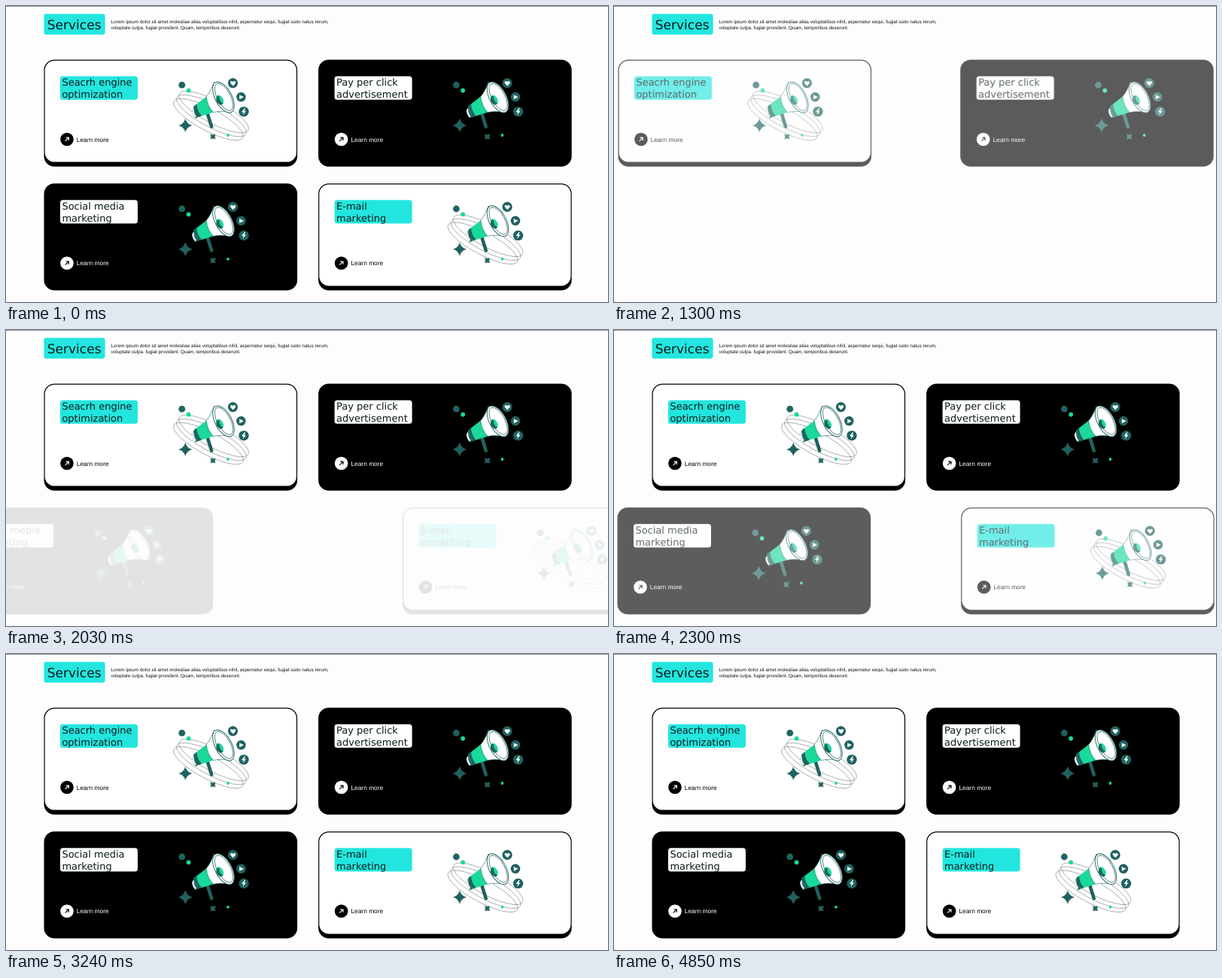
An HTML page that plays this animation: 800x394 px, repeating every 4910 ms.

```html
<!DOCTYPE html>
<html lang="en">
<head>
<meta charset="utf-8">
<title>Services</title>
<style>
  html, body { margin: 0; width: 100%; height: 100%; overflow: hidden; background: #fdfdfd; }
  svg { display: block; }
  text { text-rendering: geometricPrecision; }
  .title, .heading { font-family: "DejaVu Sans", Verdana, sans-serif; fill: #0b1a1a; }
  .title { font-size: 17px; }
  .heading { font-size: 13px; }
  .intro, .more { font-family: "Liberation Sans", Arial, sans-serif; }
  .intro { font-size: 6.3px; fill: #111; }
  .more { font-size: 8.4px; }
  .teal { fill: #1f625f; }
  .green { fill: #19d99b; }
  .line { fill: none; stroke: #1f625f; stroke-width: .7; }
  .ring { fill: none; stroke: #777; stroke-width: .55; }
</style>
</head>
<body>
<svg id="stage" width="800" height="394" overflow="hidden">
  <defs>
    <g id="rings" class="ring">
      <ellipse rx="52" ry="15" transform="translate(276 141) rotate(28)"/>
      <ellipse rx="52" ry="15" transform="translate(273 146) rotate(28)"/>
      <ellipse rx="52" ry="15" transform="translate(269 151) rotate(28)"/>
    </g>
    <g id="art">
      <circle class="teal" cx="233.8" cy="105.2" r="4.4"/>
      <circle class="green" cx="242.6" cy="112.5" r="2.9"/>
      <circle class="green" cx="294.9" cy="172" r="1.9"/>
      <g class="teal" stroke="#477f7c" stroke-width=".4">
        <path d="M238.3 150.3Q240.2 157 247 159Q240.2 161 238.3 167.6Q236.4 161 229.7 159Q236.4 157 238.3 150.3Z"/>
        <path d="M271.8 170.7Q275 172.2 278.2 170.7Q276.8 173.9 278.2 177.1Q275 175.6 271.8 177.1Q273.2 173.9 271.8 170.7Z"/>
      </g>

      <!-- badges -->
      <g class="teal">
        <circle cx="301.5" cy="102.6" r="6.6"/>
        <circle cx="312.4" cy="121.1" r="6.3"/>
        <circle cx="316" cy="140.6" r="6.7"/>
      </g>
      <g fill="#fff">
        <path d="M301.7 106.4L298.4 103C296.8 100.6 300.2 98.9 301.6 101.2C303 98.9 306.4 100.6 304.9 103Z"/>
        <path d="M310.2 118.2L316 121.2L310.2 124.2Z"/>
        <path d="M316.8 136.2L313 141.2H315.6L314.6 145.2L319 139.8H316.4L318.2 136.2Z"/>
      </g>

      <!-- megaphone -->
      <path d="M268 144L273.2 160.6" fill="none" stroke="#1f625f" stroke-width="4.6" stroke-linecap="round"/>
      <path d="M249.8 134L247.4 139.2Q248 145 252 149.6L257 147Z" class="teal"/>
      <path d="M248.2 136.6L247.2 140Q247.8 144.6 251 148.4L253 146.8Q249.4 142.4 249.6 136.4Z" fill="#e9f6f4"/>
      <path d="M266.2 120.6L249.6 133.4Q250.6 141.8 256.2 147.4L275.6 141.4Z" class="green"/>
      <path d="M249.6 133.4Q250.6 141.8 256.2 147.4L260 146.2Q254 139.6 253.4 130.6Z" class="teal"/>
      <path d="M276.6 101Q272 114 266.2 120.6Q267.6 133.6 275.6 141.6Q286 139 299.6 142Z" fill="#fff" stroke="#1f625f" stroke-width=".6"/>
      <g transform="translate(289 121.5) rotate(62)">
        <ellipse rx="22.4" ry="11" fill="#fff" stroke="#1f625f" stroke-width=".9"/>
        <ellipse class="line" cy="-.6" rx="20" ry="8.8"/>
      </g>
      <ellipse class="green" rx="6.8" ry="4.4" transform="translate(284.2 125) rotate(62)"/>
      <path d="M280 121.2Q277.6 127.8 284.4 131.4Q287.6 132 288.2 129.6Q283.2 127.4 283.2 119.6Q281.2 119.4 280 121.2Z" class="teal"/>
    </g>
  </defs>

  <rect width="800" height="394" fill="#fdfdfd"/>
  <rect width="800" height="1" fill="#929292"/>
  <rect x="50.4" y="10.6" width="81.2" height="27.4" rx="3" fill="#22e6df"/>
  <text class="title" x="54.8" y="31">Services</text>
  <text class="intro" x="139.6" y="23.2">Lorem ipsum dolor sit amet molestiae alias voluptatibus nihil, aspernatur sequi, fugiat iusto natus rerum,</text>
  <text class="intro" x="139.6" y="30.6">voluptate culpa. fugiat provident. Quam, temporibus deserunt.</text>
</svg>
<script>
  const LOOP = 4910, CLEAR = 300, SLIDE = 1040, SHIFT = 125;
  const ROW_START = [915, 1920];
  const COL_STEP = 364.6, ROW_STEP = 164.8;

  const cards = [
    { col: 0, row: 0, dark: false, lines: ["Seacrh engine", "optimization"] },
    { col: 1, row: 0, dark: true, lines: ["Pay per click", "advertisement"] },
    { col: 0, row: 1, dark: true, lines: ["Social media", "marketing"] },
    { col: 1, row: 1, dark: false, lines: ["E-mail", "marketing"] }
  ];

  function cardMarkup({ col, row, dark, lines }) {
    const ink = dark ? "#fff" : "#000";
    const paper = dark ? "#000" : "#fff";
    const face = dark ? "" :
      '<rect x="51.7" y="72.7" width="334.2" height="134.9" rx="12.6" fill="#fff"/><use href="#rings"/>';
    return `<g transform="translate(${col * COL_STEP} ${row * ROW_STEP})">
      <rect x="50.5" y="71.5" width="336.6" height="142.2" rx="13.8"/>
      ${face}
      <use href="#art"/>
      <rect x="72" y="93.4" width="103" height="31.4" rx="3.6" fill="${dark ? "#fff" : "#22e6df"}"/>
      <text class="heading" x="74.4" y="106.4">${lines[0]}</text>
      <text class="heading" x="74.4" y="122.2">${lines[1]}</text>
      <circle cx="81" cy="177.5" r="8.8" fill="${ink}"/>
      <path d="M78.7 179.8L83.1 175.4M79.6 175.2H83.3V178.9" fill="none" stroke="${paper}" stroke-width="1.2"/>
      <text class="more" x="93.8" y="180.6" fill="${ink}">Learn more</text>
    </g>`;
  }

  function addCard(card) {
    const group = document.createElementNS("http://www.w3.org/2000/svg", "g");
    group.innerHTML = cardMarkup(card);
    document.getElementById("stage").append(group);

    const start = ROW_START[card.row];
    const away = `translateX(${card.col ? SHIFT : -SHIFT}px)`;
    const home = "translateX(0px)";
    const step = (time, opacity, transform, easing = "linear") =>
      ({ offset: time / LOOP, opacity, transform, easing });

    group.animate([
      step(0, 1, home),
      step(CLEAR, 1, home),
      step(CLEAR, 0, away),
      step(start, 0, away, "ease"),
      step(start + SLIDE, 1, home),
      step(LOOP, 1, home)
    ], { duration: LOOP, iterations: Infinity });
  }

  cards.forEach(addCard);
</script>
</body>
</html>
```
